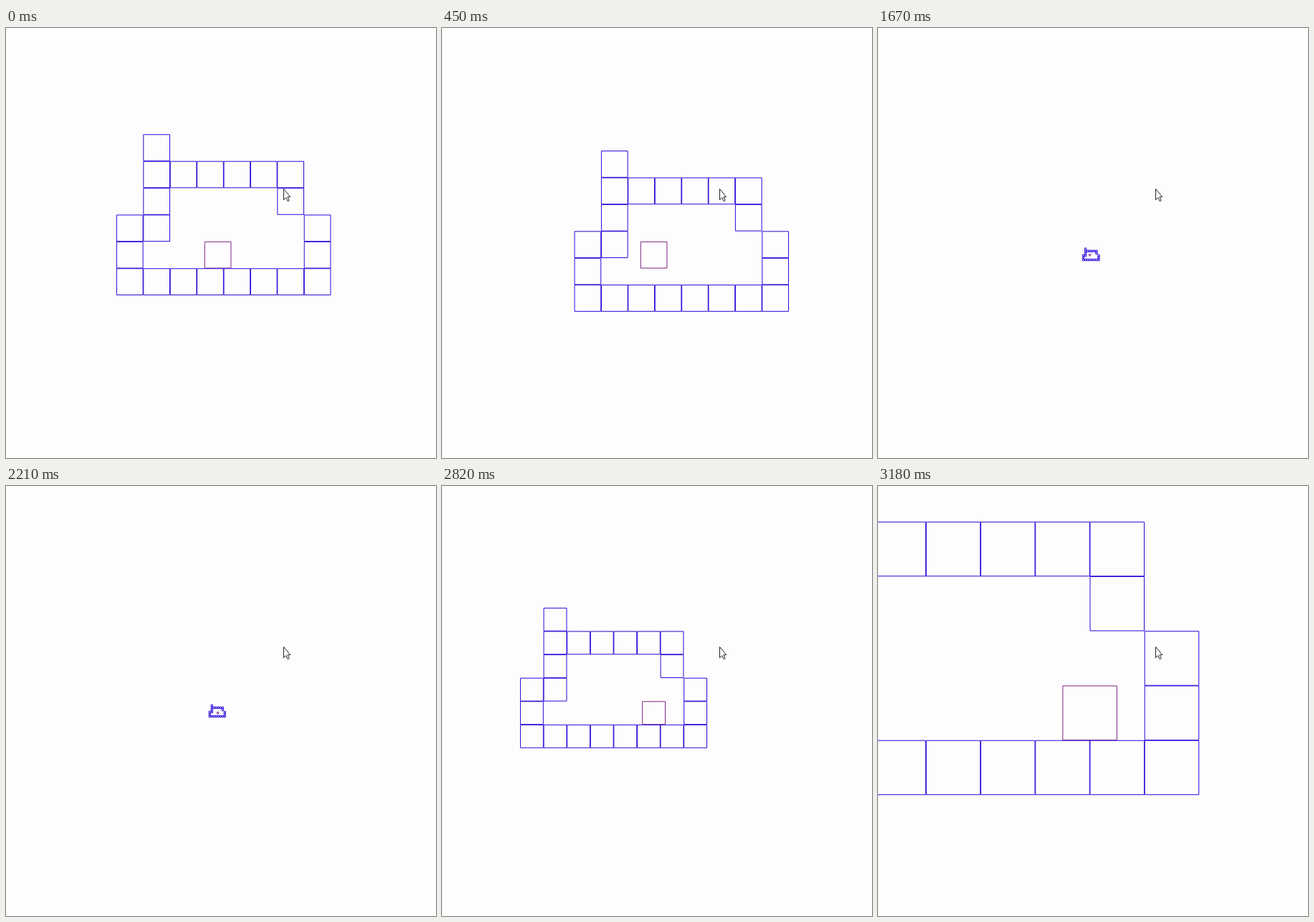
Write an HTML page that moves like this. It is 600x600 px and loops after 3210 ms.

```html
<!DOCTYPE html>
<html lang="en">
<head>
<meta charset="utf-8">
<title>Zooming platformer</title>
<style>
  html, body { margin: 0; width: 100%; height: 100%; overflow: hidden; background: #fefdfe; }
  svg { display: block; width: 100%; height: 100%; }
  path { fill: none; stroke-width: 1; }
  .cursor { fill: #fff; stroke: #222; }
</style>
</head>
<body>
<svg viewBox="0 0 600 600">
  <path id="hero" stroke="#7d2480"/>
  <path id="blocks" stroke="#2408d8"/>
  <path class="cursor" d="M387.5 224.5V239.8L390.8 236.7L393.1 241.6L395.2 240.6L392.9 235.7H396.7Z"/>
</svg>
<script>
const LOOP = 3210;
const CENTER = { x: 295.6, y: 316.7 };
const LEVEL = [
  ".#......",
  ".######.",
  ".#....#.",
  "##.....#",
  "#......#",
  "########"
];
const FLOOR = 4;
const PAUSE = 150;
const PAUSE_STARTS = [1120, 2060];
const JUMP = { start: 215, speed: 0.00296, gravity: 1.55e-6 };

// The cell size chases each target from the given game time on.
const START_SIZE = 37.4;
const ZOOM_LAG = 164;
const ZOOMS = [
  { from: 490, target: 3 },
  { from: 1990, target: 13.44 },
  { from: 2320, target: 23.8 },
  { from: 2482, target: 81.7 }
];

// Turning points of the walk: [game time, column].
const WALK = [[0, 3.283], [90, 3.4], [635, 1.99], [1060, 1.99], [2250, 4.5], [2520, 5.22], [2880, 5.5]];

const blocks = document.getElementById("blocks");
const hero = document.getElementById("hero");
const clamp = (v, lo, hi) => Math.min(hi, Math.max(lo, v));

function gameTime(t) {
  return PAUSE_STARTS.reduce((g, start) => g - clamp(t - start, 0, PAUSE), t);
}

function cellSize(g) {
  let size = START_SIZE;
  ZOOMS.forEach(({ from, target }, i) => {
    const end = i + 1 < ZOOMS.length ? ZOOMS[i + 1].from : Infinity;
    const elapsed = Math.max(0, Math.min(g, end) - from);
    size = target + (size - target) * Math.exp(-elapsed / ZOOM_LAG);
  });
  return size;
}

function column(g) {
  const i = WALK.findIndex(([time]) => time > g);
  if (i < 0) return WALK[WALK.length - 1][1];
  const [t0, x0] = WALK[i - 1], [t1, x1] = WALK[i];
  return x0 + (x1 - x0) * (g - t0) / (t1 - t0);
}

function row(g) {
  const air = Math.max(0, g - JUMP.start);
  return FLOOR - Math.max(0, JUMP.speed * air - JUMP.gravity * air * air);
}

// Square outline, offset from the hero in cells.
function square(dx, dy, size) {
  const side = size - 0.7;
  const x = CENTER.x + dx * size - side / 2;
  const y = CENTER.y + dy * size - side / 2;
  return `M${x.toFixed(2)} ${y.toFixed(2)}h${side}v${side}h${-side}z`;
}

function draw(time) {
  const g = gameTime(time % LOOP);
  const size = cellSize(g), px = column(g), py = row(g);
  let d = "";
  LEVEL.forEach((line, y) => [...line].forEach((cell, x) => {
    if (cell === "#") d += square(x - px, y - py, size);
  }));
  blocks.setAttribute("d", d);
  hero.setAttribute("d", square(0, 0, size));
}

const start = performance.now();
function tick() {
  draw(performance.now() - start);
  requestAnimationFrame(tick);
}
tick();
</script>
</body>
</html>
```
